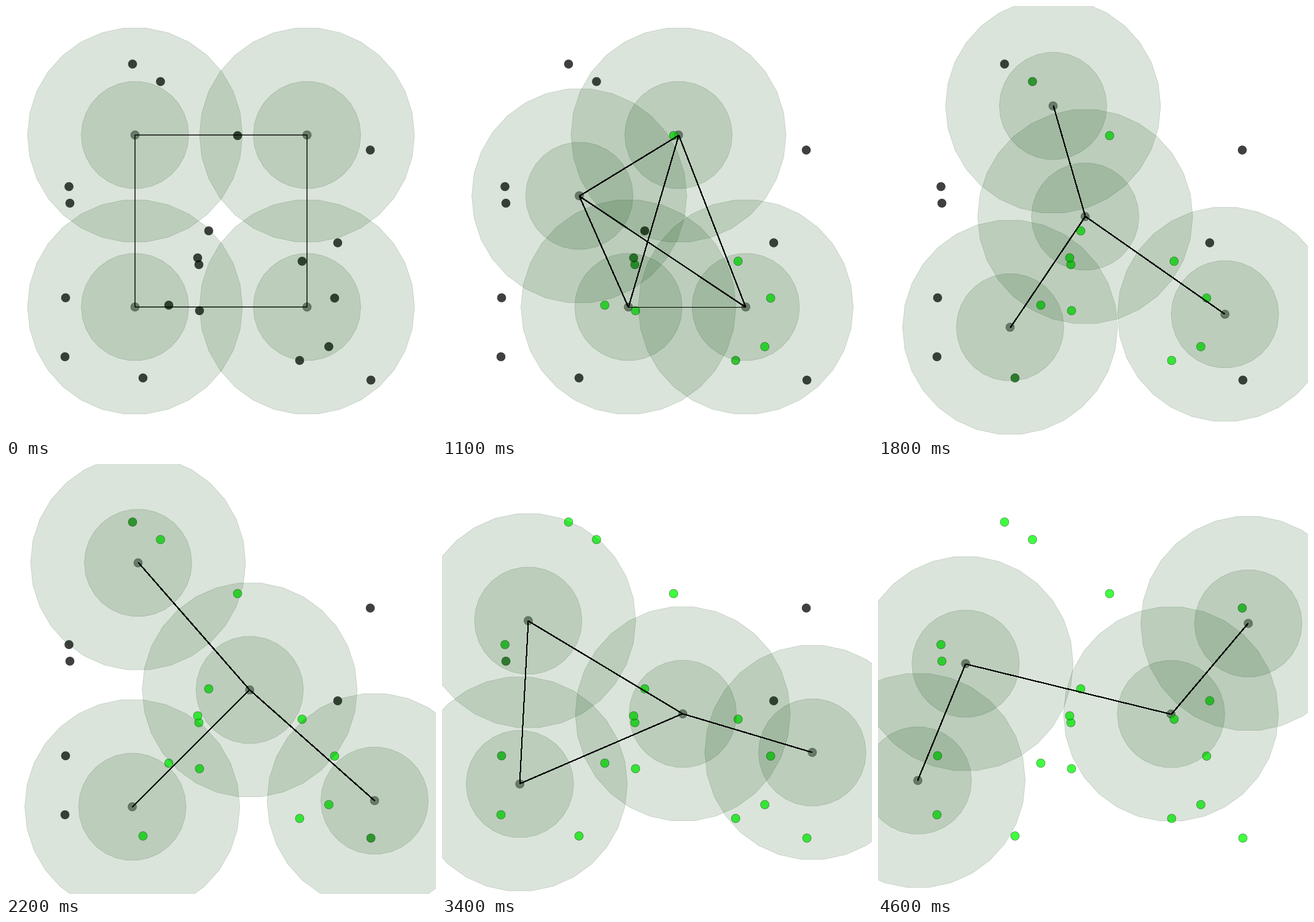
These frames come from a looping animation (700 px wide and 700 px high, 5.2 s). A matplotlib script:

```python
import itertools

import numpy as np
import matplotlib.pyplot as plt
from matplotlib.animation import FuncAnimation
from matplotlib.lines import Line2D
from matplotlib.patches import Polygon

SIZE, DPI = 700, 100
FRAMES, INTERVAL = 52, 100
HOLD, STEPS = 5, 41
DOT, SENSE, LINK = 7, 87.5, 175
PX = 72 / DPI
GAIN = 0.2  # share of green gained per covered step

# Agents start on a square grid and glide between a few (step, x, y) keys.
STARTS = [(x, y) for y in (210, 490) for x in (210, 490)]
KEYS = [
    [(6, 223.5, 309), (13, 337.3, 342.8), (17, 396.7, 367.8),
     (24, 408.6, 406.5), (35, 372, 407), (41, 477, 407)],
    [(6, 385, 210), (10, 337.5, 164), (18, 197.5, 160.5),
     (24, 137.8, 203.4), (35, 143.5, 317), (41, 142.7, 325)],
    [(6, 303.5, 490), (13, 215, 523), (17, 205.6, 558),
     (24, 157.7, 549.3), (30, 120.5, 515.2), (41, 64.8, 515.2)],
    [(4, 480, 490), (6, 494.5, 490), (9, 510, 520), (13, 564.8, 501.8),
     (17, 600, 548), (24, 602.8, 487), (28, 602.8, 487), (41, 602.8, 259.5)],
]

TARGETS = np.array([
    (206, 94.5), (251.5, 123), (377, 211), (593, 234.5), (102.5, 294),
    (104, 321), (330, 366), (314, 421), (312, 410), (482, 415.5),
    (540, 385.5), (97, 475), (265, 487), (315, 496), (535, 475.5),
    (96, 571), (478, 577), (525.5, 554.5), (594, 609), (223, 605.5),
])

ANGLE = np.arange(30) * 2 * np.pi / 30
UNIT = np.column_stack([np.cos(ANGLE), np.sin(ANGLE)])


def glide(start, keys):
    k, x, y = np.transpose([(0, *start), *keys])
    steps = np.arange(STEPS + 1)
    return np.column_stack([np.interp(steps, k, x), np.interp(steps, k, y)])


agents = np.stack([glide(s, k) for s, k in zip(STARTS, KEYS)], axis=1)
gaps = np.linalg.norm(agents[:, :, None] - TARGETS, axis=3)
covered = (gaps < SENSE).any(axis=1)
covered[0] = False
green = np.minimum(1, GAIN * covered.cumsum(axis=0))

fig = plt.figure(figsize=(SIZE / DPI, SIZE / DPI), dpi=DPI, facecolor="white")
ax = fig.add_axes([0, 0, 1, 1])
ax.set(xlim=(0, SIZE), ylim=(SIZE, 0))
ax.axis("off")


def disc(center, radius, face, edge, z):
    return ax.add_patch(Polygon(center + radius * UNIT, closed=True, fc=face,
                                ec=edge, lw=0.7 * PX, zorder=z))


VEIL, RIM = (0, 0.275, 0, 0.14), (0, 0.2, 0, 0.2)
LAYERS = [(DOT, (0, 0, 0, 0.45), (0, 0, 0, 0.4), 1),
          (LINK, VEIL, RIM, 3), (SENSE, VEIL, RIM, 4)]

bodies = [(i, r, disc(agents[0, i], r, face, edge, z))
          for r, face, edge, z in LAYERS for i in range(len(STARTS))]
dots = [disc(p, DOT, (0, 0, 0, 0.75), (0, 0, 0, 0.5), 2) for p in TARGETS]
links = {pair: ax.add_line(Line2D([], [], color="black", zorder=5, snap=False,
                                  solid_capstyle="butt"))
         for pair in itertools.combinations(range(len(STARTS)), 2)}


def draw(frame):
    k = min(max(frame - HOLD, 0), STEPS)
    pos = agents[k]
    for i, radius, body in bodies:
        body.set_xy(pos[i] + radius * UNIT)
    for dot, g in zip(dots, green[k]):
        dot.set_facecolor((0, g, 0, 0.75))
    # Soft lines at rest on the grid, crisp one-pixel lines afterwards
    soft = k == 0
    ends = pos if soft else np.floor(pos) + 0.5
    for (i, j), line in links.items():
        line.set_data(*ends[[i, j]].T)
        line.set_visible(np.linalg.norm(pos[i] - pos[j]) < 2 * LINK)
        line.set_antialiased(soft)
        line.set_linewidth((1.4 if soft else 1) * PX)
    return [b for *_, b in bodies] + dots + list(links.values())


anim = FuncAnimation(fig, draw, frames=FRAMES, interval=INTERVAL,
                     repeat=True, repeat_delay=0, blit=False)
plt.show()
```
